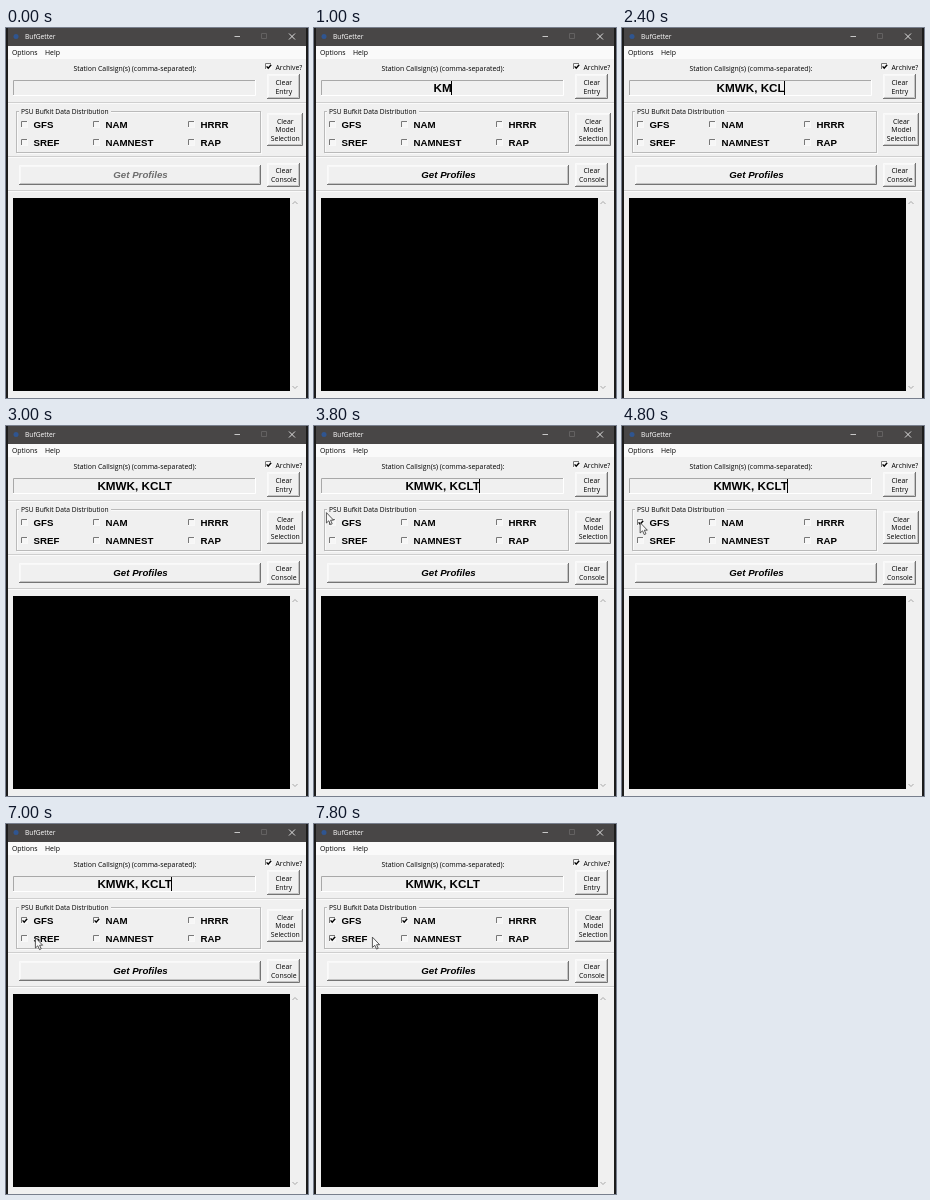
Animation, 302 px wide and 370 px high, one loop 8 s. Source, as an HTML page:

```html
<!DOCTYPE html>
<html lang="en">
<head>
<meta charset="utf-8">
<title>BufGetter</title>
<style>
html, body { margin: 0; width: 100%; height: 100%; overflow: hidden; background: #f0f0f0; }
svg { display: block; width: 302px; height: 370px; font: 6.9px "Open Sans", "Noto Sans", sans-serif; font-kerning: none; }
.mid { text-anchor: middle; }
.small { font-size: 6.7px; }
.bold { font: bold 9.7px "Liberation Sans", Arial, sans-serif; }
.entry { font-size: 11.7px; }
.go { font-style: italic; }
</style>
</head>
<body>
<svg id="stage" viewBox="0 0 302 370"></svg>
<script>
const STEP = 200, LOOP = 8000;
const stage = document.getElementById("stage");

function add(tag, attrs, text) {
  const el = document.createElementNS("http://www.w3.org/2000/svg", tag);
  for (const key in attrs) el.setAttribute(key, attrs[key]);
  if (text) el.textContent = text;
  return stage.appendChild(el);
}
const box = (x, y, width, height, fill) => add("rect", { x, y, width, height, fill });
const line = (d, stroke, width = 1) => add("path", { d, stroke, fill: "none", "stroke-width": width });
const label = (x, y, text, cls = "", fill = "#000") => add("text", { x, y, class: cls, fill }, text);

// Two-tone border: one colour on the top and left, another on the bottom and right
function bevel(x, y, w, h, light, dark) {
  line(`M${x + .5} ${y + h}V${y + .5}H${x + w}`, light);
  line(`M${x} ${y + h - .5}H${x + w - .5}V${y}`, dark);
}
function groove(x, y, w, h) {
  add("rect", { x: x + 1.5, y: y + 1.5, width: w - 1, height: h - 1, fill: "none", stroke: "#fafafa" });
  add("rect", { x: x + .5, y: y + .5, width: w - 1, height: h - 1, fill: "none", stroke: "#bababa" });
}
function button(x, y, w, h, lines) {
  bevel(x, y, w, h, "#fafafa", "#747474");
  bevel(x + 1, y + 1, w - 2, h - 2, "#f8f8f8", "#c4c4c4");
  lines.forEach((text, i) =>
    label(x + w / 2 + .3, y + h / 2 + 2.8 + (i - (lines.length - 1) / 2) * 8.8, text, "mid"));
}
function check(x, y) {
  box(x, y, 7, 7, "#f6f6f6");
  bevel(x, y, 7, 7, "#777", "#f8f8f8");
  return line(`M${x + 1.6} ${y + 3.4}l1.6 1.8l3-3.4`, "#000", 1.4);
}
function option(x, y, text) {
  label(x + 12.5, y + 7, text, "bold");
  return check(x, y);
}

// Title bar and menu
box(0, 0, 302, 370, "#1c1c1c");
box(2, 0, 298, 370, "#f0f0f0");
box(2, 0, 298, 18, "#484646");
add("circle", { cx: 10, cy: 8.5, r: 2.5, fill: "#2f5590" });
label(19, 11, "BufGetter", "small", "#fff");
line("M228.5 8.5h5.5", "#c8c8c8");
line("M255.5 5.5h5v5h-5z", "#636161");
line("M283 5.5l6 6m0-6l-6 6", "#eee", .9);
box(2, 18, 298, 13, "#fafafa");
label(6, 26.5, "Options");
label(39, 26.5, "Help");

// Station entry
label(129, 43, "Station Callsign(s) (comma-separated):", "mid");
check(259, 35);
label(269.5, 41.5, "Archive?");
bevel(7, 52, 243, 16, "#a8a8a8", "#fff");
button(261, 46, 33, 25, ["Clear", "Entry"]);
const entry = label(128.6, 64, "", "mid bold entry");
const caret = box(0, 53, 1, 14, "#000");

// Section rules
for (const y of [74, 128, 162]) {
  box(2, y, 298, 1, "#cfcfcf");
  box(2, y + 1, 298, 1, "#fafafa");
}

// Model choices
groove(10, 83, 245, 42);
box(13, 80, 92, 8, "#f0f0f0");
label(15, 86, "PSU Bufkit Data Distribution", "small");
const ticks = ["GFS", "NAM", "HRRR", "SREF", "NAMNEST", "RAP"].map((name, i) =>
  option([15, 87, 182][i % 3], i < 3 ? 93 : 111, name));
button(261, 85, 36, 33, ["Clear", "Model", "Selection"]);

// Action row and console
button(13, 137, 242, 20, []);
const go = label(134.5, 150, "Get Profiles", "mid bold go");
button(261, 135, 33, 24, ["Clear", "Console"]);
box(7, 170, 277, 193, "#000");
line("M286.5 176l2.5-2.5l2.5 2.5M286.5 358l2.5 2.5l2.5-2.5", "#a8a8a8");

const pointer = add("path", {
  d: "M.4 .6V11L2.8 8.8L4.5 12.6L6.2 11.8L4.6 8.2H7.6Z",
  fill: "#f8f8f8", stroke: "#333", "stroke-width": .8
});

const WORDS = "KMWK, KCLT", FIRST_KEY = 4;
const CHECKED_AT = [23, 31, 99, 37, 99, 99];
// [step, x, y]: pointer stops, straight moves between them
const STOPS = [[18, 20, 76], [19, 12, 86], [21, 17, 96], [25, 18, 96], [27, 45, 95], [29, 75, 93.5],
  [30, 90, 96], [31, 90, 96], [33, 30, 113], [35, 29, 113], [36, 18, 114], [37, 18, 114], [39, 58, 112.5]];

function pointerAt(n) {
  const i = Math.max(1, STOPS.findIndex(s => s[0] >= n));
  const [a, b] = [STOPS[i - 1], STOPS[i]];
  const k = (n - a[0]) / (b[0] - a[0]);
  return [1, 2].map(j => a[j] + (b[j] - a[j]) * k);
}

function draw(now) {
  const n = Math.floor(now % LOOP / STEP);
  entry.textContent = WORDS.slice(0, Math.max(0, n - FIRST_KEY + 1)).trim();
  go.setAttribute("fill", n < FIRST_KEY ? "#6d6d6d" : "#000");

  // The caret blinks 600 ms on, 300 ms off, in a recording sped up a little
  const blink = n * 252 % 900;
  caret.setAttribute("visibility", blink >= 225 && blink < 825 ? "visible" : "hidden");
  caret.setAttribute("x", Math.round(128 + entry.getComputedTextLength() / 2));

  ticks.forEach((t, i) => t.setAttribute("visibility", n >= CHECKED_AT[i] ? "visible" : "hidden"));
  const shown = n >= STOPS[0][0];
  pointer.setAttribute("visibility", shown ? "visible" : "hidden");
  if (shown) pointer.setAttribute("transform", `translate(${pointerAt(n)})`);
}

const start = performance.now();
function loop() {
  draw(performance.now() - start);
  requestAnimationFrame(loop);
}
loop();
</script>
</body>
</html>
```
